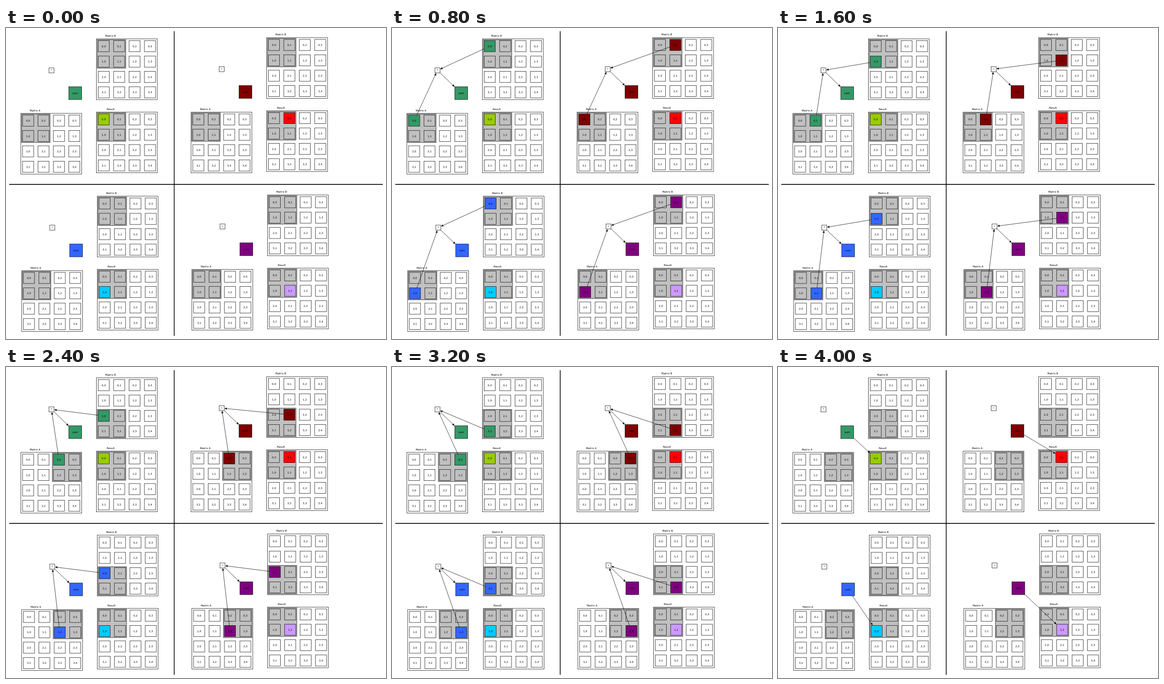
An HTML page with a canvas for the animation above (4800 ms loop, 826 by 678 pixels).

```html
<!DOCTYPE html>
<html lang="en">
<head>
<meta charset="utf-8">
<title>Tiled matrix multiplication</title>
<style>
  html, body { margin: 0; width: 100%; height: 100%; overflow: hidden; background: #fff; }
  canvas { display: block; width: 826px; height: 678px; }
</style>
</head>
<body>
<canvas id="stage"></canvas>
<script>
const W = 826, H = 678, STEP = 800, STEPS = 6;
const PITCH = 33.5, CELL = 24.2, GRAY = '#c0c0c0';

// Centre of cell 0,0 and of the caption, relative to a panel.
const A = { name: 'Matrix A', x: 48.1, y: 202, lx: 63, ly: 179.6 };
const B = { name: 'Matrix B', x: 212.5, y: 39.7, lx: 227.2, ly: 16.8 };
const R = { name: 'Result', x: 212.5, y: 199.2, lx: 227.6, ly: 176.6 };
const STAR = { x: 98.8, y: 92.4, size: 11 };
const SUM = { x: 150.5, y: 142, size: 28 };

// Each panel computes the result cell (row, col).
const panels = [
  { x: 0, y: 0, row: 0, col: 0, main: '#339966', out: '#99cc00' },
  { x: 370, y: -2.7, row: 0, col: 1, main: '#800000', out: '#ff0000' },
  { x: 1.8, y: 342.9, row: 1, col: 0, main: '#3366ff', out: '#00ccff' },
  { x: 371.8, y: 340.2, row: 1, col: 1, main: '#800080', out: '#cc99ff', firstColAt: 2 }
];

const canvas = document.getElementById('stage');
const ctx = canvas.getContext('2d');
const dpr = window.devicePixelRatio || 1;
canvas.width = W * dpr;
canvas.height = H * dpr;

function box(x, y, size, fill) {
  ctx.fillStyle = fill;
  ctx.fillRect(x - size / 2, y - size / 2, size, size);
  ctx.strokeRect(x - size / 2, y - size / 2, size, size);
}

function label(text, x, y) {
  ctx.fillStyle = '#000';
  ctx.fillText(text, x, y + 2);
}

function line(x1, y1, x2, y2) {
  ctx.beginPath();
  ctx.moveTo(x1, y1);
  ctx.lineTo(x2, y2);
  ctx.stroke();
}

const cellAt = (m, row, col) => ({ x: m.x + col * PITCH, y: m.y + row * PITCH, size: CELL });

// Draws a matrix with a shaded 2x2 tile and one optional coloured cell.
function matrix(m, tileRow, tileCol, hot, color) {
  label(m.name, m.lx, m.ly);
  box(m.x + 1.5 * PITCH, m.y + 1.5 * PITCH, 132.4, '#fff');
  box(m.x + (tileCol + 0.5) * PITCH, m.y + (tileRow + 0.5) * PITCH, 62, GRAY);
  for (let r = 0; r < 4; r++) {
    for (let c = 0; c < 4; c++) {
      const p = cellAt(m, r, c);
      const shaded = r >> 1 === tileRow >> 1 && c >> 1 === tileCol >> 1;
      const isHot = hot && hot[0] === r && hot[1] === c;
      box(p.x, p.y, CELL, isHot ? color : shaded ? GRAY : '#fff');
      label(r + ',' + (r === 3 ? c + 1 : c), p.x, p.y);
    }
  }
}

// Arrow along the line between two box centres, clipped to their edges.
function arrow(from, to) {
  const dx = to.x - from.x, dy = to.y - from.y;
  const reach = Math.max(Math.abs(dx), Math.abs(dy));
  const s = from.size / 2 / reach, e = 1 - (to.size / 2 + 0.4) / reach;
  const x = from.x + dx * e, y = from.y + dy * e;
  line(from.x + dx * s, from.y + dy * s, x - dx / reach * 2, y - dy / reach * 2);
  ctx.save();
  ctx.translate(x, y);
  ctx.rotate(Math.atan2(dy, dx));
  ctx.beginPath();
  ctx.moveTo(0, 0);
  ctx.lineTo(-5.8, -2.4);
  ctx.lineTo(-4.8, 0);
  ctx.lineTo(-5.8, 2.4);
  ctx.fillStyle = '#000';
  ctx.fill();
  ctx.restore();
}

function panel(p, step) {
  const k = step - 1;
  const multiplying = step > 0 && step < 5;
  const half = step < 3 ? 0 : 2;
  const bCol = k === p.firstColAt ? 0 : p.col;
  ctx.save();
  ctx.translate(p.x, p.y);
  matrix(A, 0, half, multiplying && [p.row, k], p.main);
  matrix(B, half, 0, multiplying && [k, bCol], p.main);
  matrix(R, 0, 0, [p.row, p.col], p.out);
  box(STAR.x, STAR.y, STAR.size, '#fff');
  label('*', STAR.x, STAR.y);
  box(SUM.x, SUM.y, SUM.size, p.main);
  label('sum', SUM.x, SUM.y);
  if (multiplying) {
    arrow(cellAt(A, p.row, k), STAR);
    arrow(cellAt(B, k, bCol), STAR);
    arrow(STAR, SUM);
  } else if (step === 5) {
    arrow(SUM, cellAt(R, p.row, p.col));
  }
  ctx.restore();
}

function draw(step) {
  ctx.setTransform(dpr, 0, 0, dpr, 0, 0);
  ctx.fillStyle = '#fff';
  ctx.fillRect(0, 0, W, H);
  ctx.font = '5.6px "DejaVu Sans", sans-serif';
  ctx.textAlign = 'center';
  ctx.textRendering = 'geometricPrecision';
  ctx.strokeStyle = '#000';
  ctx.lineWidth = 0.75;
  panels.forEach(p => panel(p, step));
  ctx.lineWidth = 1.6;
  line(365.6, 7, 365.6, 671);
  line(7, 340.9, 819, 340.9);
}

let start, shown = -1;
function tick(now) {
  if (start === undefined) start = now;
  const step = Math.floor((now - start) / STEP) % STEPS;
  if (step !== shown) draw(shown = step);
  requestAnimationFrame(tick);
}
requestAnimationFrame(tick);
</script>
</body>
</html>
```
